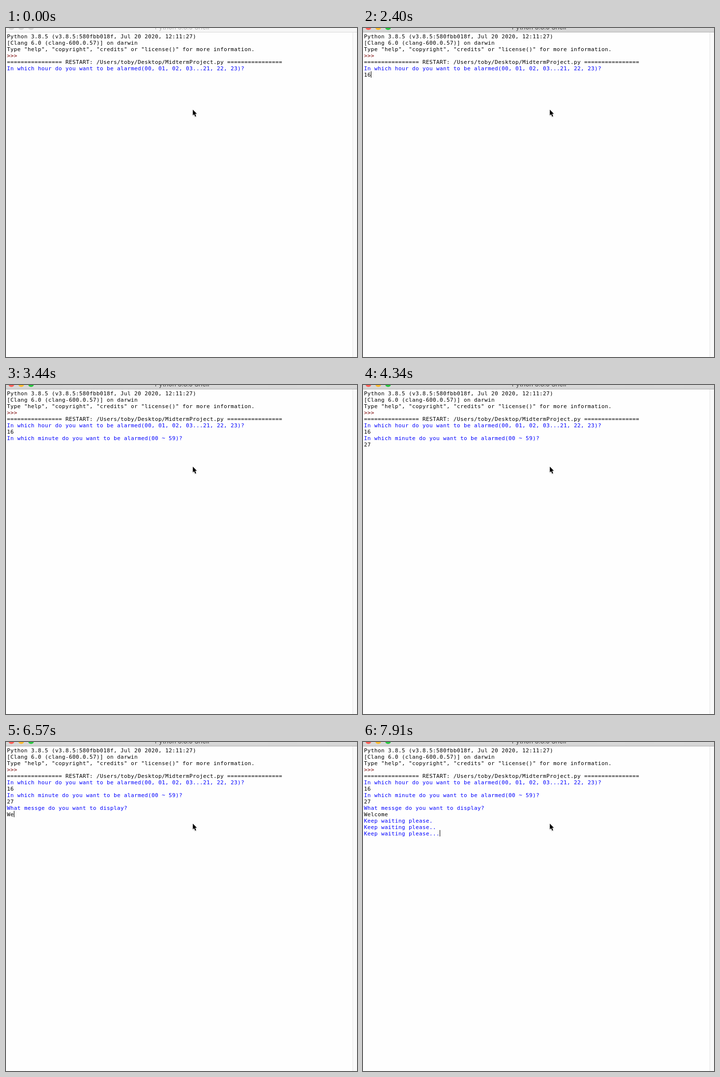
Write an HTML page that moves like this. It is 714 px wide and 669 px high and loops after 8 s.

```html
<!DOCTYPE html>
<html lang="en">
<head>
<meta charset="utf-8">
<title>Alarm clock session</title>
<style>
  html, body { margin: 0; width: 100%; height: 100%; overflow: hidden; background: #fefefe; }
  svg { display: block; }
  .shell { font: 11px "DejaVu Sans Mono", monospace; }
  .title { font: 13px Inter, sans-serif; text-anchor: middle; }
</style>
</head>
<body>
<svg id="stage" width="714" height="669" viewBox="0 0 714 669">
  <defs>
    <linearGradient id="bar" gradientUnits="userSpaceOnUse" x1="0" y1="-13" x2="0" y2="9">
      <stop offset="0" stop-color="#e7e7e7"/>
      <stop offset="1" stop-color="#d2d2d2"/>
    </linearGradient>
    <filter id="soft" x="-50%" y="-50%" width="200%" height="200%">
      <feGaussianBlur stdDeviation="1"/>
    </filter>
    <path id="arrow" d="M0 0V11.8L2.7 9.3L4.8 14.2L6.8 13.4L4.7 8.5H8.3Z"/>
  </defs>
  <rect width="714" height="669" fill="#fefefe"/>
  <rect x="705" y="9" width="9" height="660" fill="#fafafa"/>
  <rect x="705" y="9" width="1" height="660" fill="#e6e6e6"/>
  <g id="titlebar">
    <rect id="barFill" width="714" height="8"/>
    <rect id="barEdge" y="8" width="714" height="1"/>
    <text id="title" class="title" x="358" y="3">Python 3.8.5 Shell</text>
  </g>
  <g id="text" class="shell"></g>
  <rect id="caret" width="1" height="13" fill="#000"/>
  <g transform="translate(380 166)">
    <use href="#arrow" y="1.5" fill="#000" opacity=".35" filter="url(#soft)"/>
    <use href="#arrow" fill="#000" stroke="#fff" stroke-width="1.6" paint-order="stroke"/>
  </g>
</svg>
<script>
const LOOP = 8000, LEFT = 2, TOP = 10, CELL = 7, LEADING = 13;
const BLACK = "#000", BLUE = "#00f", RED = "#700";
const FOCUS_TIME = 1050;
const NS = "http://www.w3.org/2000/svg";
const byId = id => document.getElementById(id);

function add(parent, tag, attrs) {
  const el = document.createElementNS(NS, tag);
  for (const key in attrs) el.setAttribute(key, attrs[key]);
  return parent.appendChild(el);
}

// One entry per row: text, colour, time it is printed.
const rule = "=".repeat(16);
const printed = (text, color, at = 0) => ({ text, color, steps: [[at, text.length]] });
// Typed rows grow by steps of [time, characters shown].
const typed = (text, ...steps) => ({ text, color: BLACK, steps });

const rows = [
  printed("Python 3.8.5 (v3.8.5:580fbb018f, Jul 20 2020, 12:11:27)", BLACK),
  printed("[Clang 6.0 (clang-600.0.57)] on darwin", BLACK),
  printed('Type "help", "copyright", "credits" or "license()" for more information.', BLACK),
  printed(">>>", RED),
  printed(`${rule} RESTART: /Users/toby/Desktop/MidtermProject.py ${rule}`, BLACK),
  printed("In which hour do you want to be alarmed(00, 01, 02, 03...21, 22, 23)?", BLUE),
  typed("16", [1950, 1], [2400, 2]),
  printed("In which minute do you want to be alarmed(00 ~ 59)?", BLUE, 2690),
  typed("27", [3740, 1], [4190, 2]),
  printed("What messge do you want to display?", BLUE, 4490),
  typed("Welcome", [5830, 1], [6420, 2], [6870, 3], [7170, 5], [7470, 6], [7760, 7]),
  printed("Keep waiting please.", BLUE, 7910),
  printed("Keep waiting please..", BLUE, 7910),
  printed("Keep waiting please...", BLUE, 7910)
];

// Caret visibility: [from, to, row]; it sits after the row's last character.
const caretSpans = [
  [1200, 1650, 6], [1950, 2550, 6],
  [2840, 3440, 8], [3740, 4340, 8],
  [4630, 5230, 10], [5530, 6130, 10], [6570, 7170, 10], [7470, 7910, 10],
  [7910, LOOP, 13]
];

// The shell sets every character on a fixed cell grid.
rows.forEach((row, i) => {
  row.el = add(byId("text"), "text", {
    x: [...row.text].map((_, col) => LEFT + CELL * col).join(" "),
    y: TOP + LEADING * i + 11,
    fill: row.color
  });
});

const lights = ["#ff5f57", "#febc2e", "#28c840"].map((color, i) => ({
  color,
  el: add(byId("titlebar"), "circle", { cx: 11 + 20 * i, cy: -2, r: 6 })
}));

const shownCount = (row, t) =>
  row.steps.reduce((count, [at, n]) => (t >= at ? n : count), 0);

function drawTitlebar(active) {
  byId("barFill").setAttribute("fill", active ? "url(#bar)" : "#f6f6f6");
  byId("barEdge").setAttribute("fill", active ? "#b4b4b4" : "#d8d8d8");
  byId("title").setAttribute("fill", active ? "#484848" : "#b0b0b0");
  for (const { el, color } of lights) el.setAttribute("fill", active ? color : "#dadada");
}

function draw(t) {
  drawTitlebar(t >= FOCUS_TIME);
  for (const row of rows) {
    const text = row.text.slice(0, shownCount(row, t));
    if (row.el.textContent !== text) row.el.textContent = text;
  }
  const span = caretSpans.find(([from, to]) => t >= from && t < to);
  const caret = byId("caret");
  caret.setAttribute("visibility", span ? "visible" : "hidden");
  if (span) {
    caret.setAttribute("x", LEFT + CELL * shownCount(rows[span[2]], t));
    caret.setAttribute("y", TOP + LEADING * span[2]);
  }
}

const start = performance.now();
function tick() {
  draw((performance.now() - start) % LOOP);
  requestAnimationFrame(tick);
}
tick();
</script>
</body>
</html>
```
